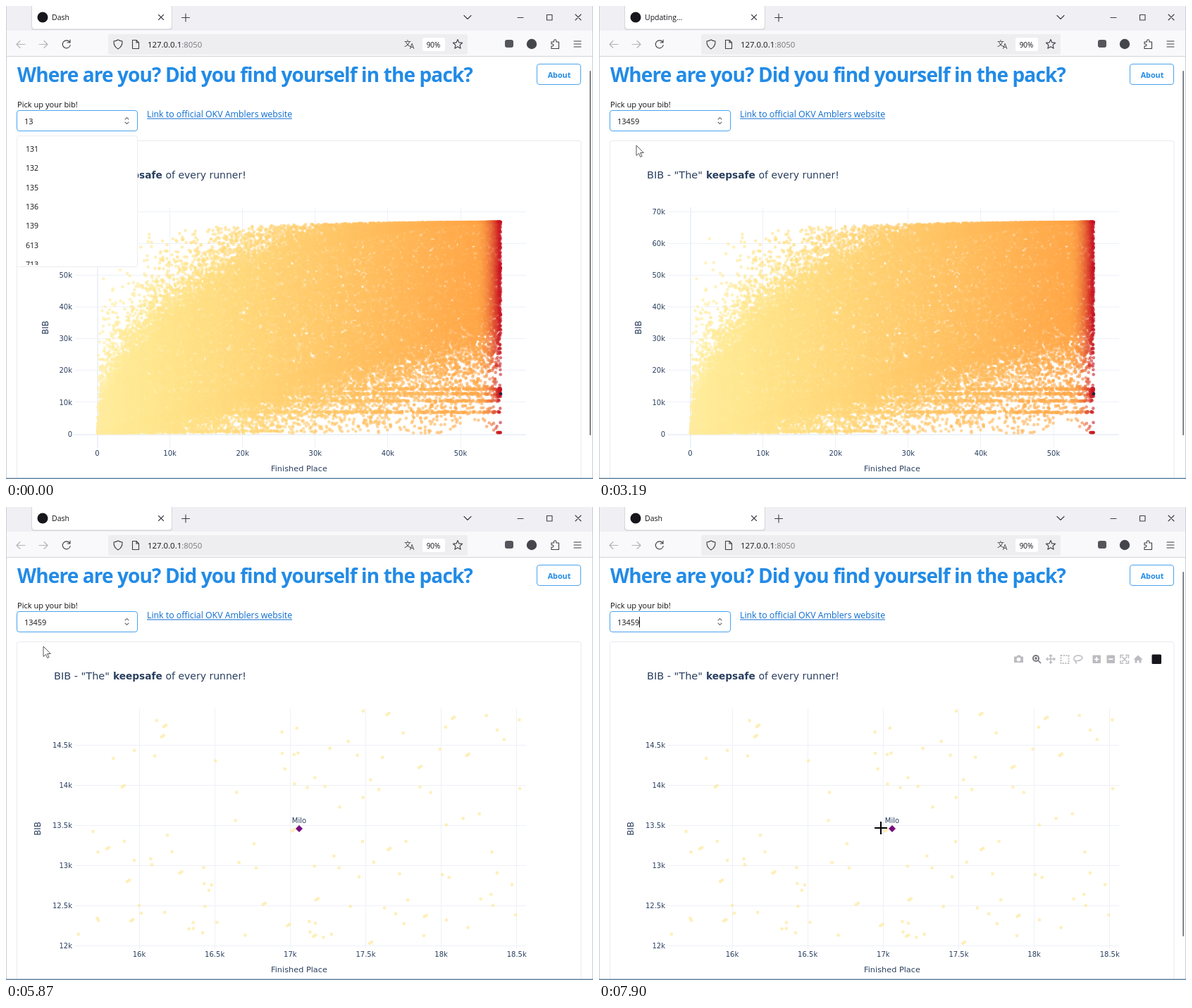
Animation, 833 px wide and 672 px high, one loop 8000 ms. Source, as an HTML page with a canvas:

```html
<!DOCTYPE html>
<html lang="en">
<head>
<meta charset="utf-8">
<title>Bib explorer</title>
<style>
html, body { margin: 0; width: 100%; height: 100%; overflow: hidden; background: #fff; }
canvas, svg { position: absolute; left: 0; top: 0; display: block; }
svg { font-family: "Open Sans", "Noto Sans", sans-serif; }
.plot { font-family: "DejaVu Sans", sans-serif; fill: #2a3f5f; font-size: 10px; }
.line { fill: none; stroke: #3c3c44; stroke-width: 1.1; stroke-linecap: round; stroke-linejoin: round; }
.soft { stroke: #b3b3b9; }
.mid { text-anchor: middle; }
.end { text-anchor: end; }
</style>
</head>
<body>
<canvas id="chart" width="833" height="672"></canvas>
<svg id="stage" width="833" height="672" viewBox="0 0 833 672">
  <!-- window frame and tab strip -->
  <rect width="833" height="36" fill="#f0f0f4"/>
  <rect y="35" width="833" height="36" fill="#f9f9fb"/>
  <rect y="71" width="833" height="1" fill="#d4d4da"/>
  <rect x="36" y="-3" width="200" height="37" rx="4" fill="#d5d5db"/>
  <rect x="37" y="-3" width="198" height="35.5" rx="4" fill="#fff"/>
  <circle cx="52" cy="16" r="7.5" fill="#16161c"/>
  <text id="tab" x="65" y="20" font-size="10.5" fill="#15141a">Dash</text>
  <path class="line" d="M216.500 12.500l7 7m0-7l-7 7M255 11v11m-5.500-5.500h11M650 13.500l5 5 5-5M726 16.500h8M767.500 12.500h7.500v7.500h-7.500zM808 12l8 8m0-8l-8 8"/>
  <!-- toolbar -->
  <path class="line soft" d="M27 54.500H15m5-5l-5 5 5 5M47 54.500h12m-5-5l5 5-5 5"/>
  <path class="line" d="M90.500 51.500a5.500 5.500 0 1 0 .700 4M91 48v4h-4"/>
  <rect x="145" y="40" width="510" height="29" rx="3" fill="#eeeef1"/>
  <path class="line" d="M159 48q3 1.800 6 2c.300 5-1.500 8.500-6 11-4.500-2.500-6.300-6-6-11q3-.200 6-2zM179.500 48.500h5.500l3.500 3.500v8.500h-9zM185 48.500v3.500h3.500"/>
  <text x="201" y="59" font-size="11.4" fill="#15141a">127.0.0.1<tspan fill="#77777e">:8050</tspan></text>
  <text x="565" y="57" font-size="10" fill="#3c3c44" font-family="Noto Sans CJK SC, Noto Sans CJK, sans-serif">文</text>
  <text x="573" y="61" font-size="10" fill="#3c3c44">A</text>
  <rect x="591" y="45" width="32" height="19" rx="3" fill="#fff"/>
  <text class="mid" x="606.500" y="58.500" font-size="10" fill="#15141a">90%</text>
  <path id="star" class="line"/>
  <rect x="708" y="48" width="12" height="11" rx="3" fill="#55555c"/>
  <circle cx="746" cy="54" r="7.200" fill="#45454c"/>
  <path class="line" d="M774 51h3.500v-1.500a1.700 1.700 0 0 1 3.400 0V51h3.600v9.500h-10.500V57h1.500a1.500 1.500 0 0 0 0-3H774zM806 50h10m-10 4h10m-10 4h10"/>
  <!-- page header -->
  <text x="16" y="108" font-size="28" font-weight="700" letter-spacing="-.88" fill="#228be6">Where are you? Did you find yourself in the pack?</text>
  <rect x="753.500" y="82.500" width="62" height="29" rx="3.500" fill="#fff" stroke="#4aa3ee"/>
  <text class="mid" x="785" y="101.500" font-size="10.8" font-weight="700" fill="#228be6">About</text>
  <text x="16" y="144" font-size="11.1" fill="#111">Pick up your bib!</text>
  <text x="200" y="158" font-size="12.35" fill="#0a6bd0">Link to official OKV Amblers website</text>
  <rect x="200" y="159.500" width="206" height="1" fill="#0a6bd0"/>
  <rect x="15.500" y="148.500" width="171" height="29" rx="3.500" fill="#fff" stroke="#4aa3ee"/>
  <text id="entry" x="26" y="168" font-size="10.9" fill="#111"></text>
  <rect id="caret" y="156" width="1" height="15" fill="#111"/>
  <path class="line" style="stroke:#777" d="M169 161l2.500-2.500 2.500 2.500M169 165l2.500 2.500 2.500-2.500"/>
  <path d="M15.500 680V194q0-2.500 2.500-2.500h795q3 0 3 2.500v486" fill="none" stroke="#e8eaef"/>
  <!-- chart text -->
  <g class="plot">
    <g font-size="14"><text x="68" y="245" font-size="14.500">BIB - "The"</text><text x="152" y="245" font-weight="700" font-size="13.7">keepsafe</text><text x="226.500" y="245">of every runner!</text></g>
    <text class="mid" x="416" y="661" font-size="11.3">Finished Place</text>
    <text id="yTitle" class="mid" font-size="11.8">BIB</text>
    <g id="wideTicks"></g>
    <g id="zoom">
      <g id="zoomTicks"></g><g id="zoomDots" fill="#fee695" fill-opacity=".62"></g>
      <path d="M416 452l5 5-5 5-5-5z" fill="#7a0a80"/>
      <text class="mid" x="416" y="449">Milo</text>
    </g>
  </g>
  <!-- chart tools -->
  <g id="tools" fill="#bcbcc0">
    <path fill-rule="evenodd" d="M589 212.500h3.500l1.500-2h3.500l1.500 2h3V221h-13zM595.500 213.700a2.900 2.900 0 1 0 .010 0z"/>
    <g fill="none" stroke="#77777d" stroke-width="2"><circle cx="620" cy="215" r="4"/><path d="M623 218l4 4M618 215h4m-2-2v4" stroke-width="1.700"/></g>
    <path d="M641 210v12m-6-6h12M639 212l2-2 2 2M639 220l2 2 2-2M637 214l-2 2 2 2M645 214l2 2-2 2" fill="none" stroke="#bcbcc0" stroke-width="1.500"/>
    <rect x="655.500" y="211" width="11" height="11" fill="none" stroke="#bcbcc0" stroke-width="2" stroke-dasharray="2 1.600"/>
    <path d="M677 219c-6-2-3-8 3-8s8 4 3 6.500c-3 1.500-8 .500-7 2s2 2 .500 3" fill="none" stroke="#bcbcc0" stroke-width="1.500"/>
    <rect x="700.500" y="210.500" width="11.500" height="11.500" rx="1"/><rect x="720.500" y="210.500" width="11.500" height="11.500" rx="1"/>
    <path d="M706.200 213v6.500m-3.200-3.200h6.500M723 216.200h6.500" stroke="#fff" stroke-width="1.700"/>
    <path d="M740 215v-4.500h4.500M747 210.500h4.500v4.500M751.500 218v4H747M744.500 222H740v-4M742 212.500l7.500 7.500m0-7.500l-7.500 7.500" fill="none" stroke="#bcbcc0" stroke-width="1.500"/>
    <path d="M765 210.500l6.500 6h-2v5h-3v-3.500h-3v3.500h-3v-5h-2z"/>
    <rect x="784.500" y="209.500" width="13.500" height="13.500" rx="1.500" fill="#15151b"/>
  </g>
  <!-- suggestion list -->
  <g id="list">
    <rect id="listBox" x="15.500" y="184.500" width="171" rx="3" fill="#fff" stroke="#ececf0"/>
    <clipPath id="listClip"><rect x="16" y="185" width="170" height="183"/></clipPath>
    <g id="rows" font-size="10.6" fill="#111" clip-path="url(#listClip)"></g>
  </g>
  <rect id="bar" x="828.300" y="92" width="1.700" height="518" rx=".8" fill="#707075"/>
  <path id="arrow" d="M0 0v14.500l3.500-3.200 2.300 5.200 2.200-1-2.300-5h4.600z" fill="#fff" stroke="#44444a" stroke-width=".9" stroke-linejoin="round"/>
  <path id="cross" d="M-9 0H9M0-9V9" stroke="#000" stroke-width="2"/>
  <path d="M.5 0v672M832.500 0v672" stroke="#c9d0d8"/>
  <rect y="670.500" width="833" height="1.500" fill="#6485a3"/>
</svg>
<script>
const $ = id => document.getElementById(id);
const clamp = (v, a = 0, b = 1) => Math.min(b, Math.max(a, v));
const mix = (a, b, k) => a + (b - a) * k;
const ramp = (t, a, b) => clamp((t - a) / (b - a));
const repeat = (n, make) => Array.from({ length: n }, (_, i) => make(i));

function seeded(s) {
  return () => {
    s = (s + 0x6d2b79f5) | 0;
    let r = Math.imul(s ^ (s >>> 15), 1 | s);
    r = (r + Math.imul(r ^ (r >>> 7), 61 | r)) ^ r;
    return ((r ^ (r >>> 14)) >>> 0) / 4294967296;
  };
}

// First tick position, pixel spacing, tick counts, first values and step in thousands
const wide = { x: 129.5, dx: 103.1, nx: 6, y: 608, dy: 45.07, ny: 8, fromX: 0, fromY: 0, step: 10 };
const near = { x: 189, dx: 107.15, nx: 6, y: 623.8, dy: 57.06, ny: 6, fromX: 16, fromY: 12, step: .5 };

const thousands = v => v ? v + "k" : "0";

function ticks(a) {
  const xs = repeat(a.nx, i => `<text class="mid" x="${a.x + i * a.dx}" y="639">${thousands(a.fromX + i * a.step)}</text>`);
  const ys = repeat(a.ny, i => `<text class="end" x="94" y="${a.y - i * a.dy + 3.6}">${thousands(a.fromY + i * a.step)}</text>`);
  return xs.concat(ys).join("");
}

const ctx = $("chart").getContext("2d");

function grid(a) {
  const width = i => a === wide && !i ? 2 : 1;
  ctx.fillStyle = "#edf1f8";
  repeat(a.nx, i => ctx.fillRect(Math.round(a.x + i * a.dx - .5), 286, width(i), 342));
  repeat(a.ny, i => ctx.fillRect(97, Math.round(a.y - i * a.dy - .5), 641, width(i)));
}

// Pale yellow to orange along the axis, turning red just before the end
function colour(k) {
  const red = ramp(k, .94, 1) ** 2.2, warm = k ** 1.25;
  const base = [255, mix(237, 162, warm), mix(166, 68, Math.sqrt(k) * .5 + warm * .5)];
  return `rgb(${base.map((v, i) => Math.round(mix(v, [200, 18, 36][i], red)))})`;
}

// Bibs follow a band that rises with the place, with thin tails on both sides
function runners() {
  const rnd = seeded(41), total = 50000;
  const dots = repeat(total, i => {
    const k = i / total, pick = rnd(), tail = -Math.log(1 - rnd());
    const ceiling = 307 + 14 * (1 - k) ** 2;
    const top = 307 + 298 * (1 - k ** .6) ** 1.7;
    const low = 606 - 172 * k;
    let y = mix(top, low, rnd());
    if (pick < .15) y = top - tail * 31;
    else if (pick < .36) y = low + tail * (14 + 28 * k);
    if (y < ceiling) y = mix(ceiling, Math.max(top, ceiling), rnd());
    if (y > 607) y = mix(low, 607, rnd());
    return [k, y];
  });
  // start groups that show as level rows: height and where each begins
  for (const [y, from] of [[544, .6], [551, .22], [561, .3], [577, .2], [411, .65], [376, .75]])
    repeat(Math.round(400 * (1 - from)), () => dots.push([mix(from, 1, rnd()), y + rnd() * 2 - 1]));
  repeat(180, () => dots.push([.45 * rnd() ** 1.4, 603.5 + rnd()]));
  repeat(60, i => dots.push([mix(.99, 1, rnd()), i % 4 ? mix(543, 556, rnd()) : 606]));
  return dots.sort((a, b) => a[0] - b[0]);
}

function dot(c, x, y) {
  c.beginPath();
  c.arc(x, y, 2.3, 0, 7);
  c.fill();
}

const layer = document.createElement("canvas");
layer.width = 833;
layer.height = 672;
const ink = layer.getContext("2d");
ink.globalAlpha = .6;
for (const [k, y] of runners()) {
  ink.fillStyle = colour(k);
  dot(ink, 130 + 572 * k, y);
}
ink.globalAlpha = 1;
ink.fillStyle = "#2a2140";
dot(ink, 702, 551);

function paint(zoomed) {
  ctx.clearRect(0, 0, 833, 672);
  grid(zoomed ? near : wide);
  if (!zoomed) ctx.drawImage(layer, 0, 0);
}

// Neighbours of the chosen runner; some finish side by side
function neighbours() {
  const rnd = seeded(9);
  let x, y;
  return repeat(135, i => {
    const close = i % 7 === 6;
    x = close ? x + 3 : mix(99, 734, rnd());
    y = close ? y - 2 : mix(289, 626, rnd());
    return `<circle cx="${x.toFixed(1)}" cy="${y.toFixed(1)}" r="2.4"/>`;
  }).join("");
}

$("zoomDots").innerHTML = neighbours();
$("wideTicks").innerHTML = ticks(wide);
$("zoomTicks").innerHTML = ticks(near);
$("star").setAttribute("d", "M" + repeat(10, i => {
  const r = i % 2 ? 3.2 : 7, a = i * Math.PI / 5;
  return `${641 + r * Math.sin(a)} ${54.5 - r * Math.cos(a)}`;
}).join("L") + "Z");

const bib = "13459";

function typed(t) {
  return bib.slice(0, t < 520 ? 2 : t < 720 ? 3 : t < 1320 ? 4 : 5);
}

function matches(q) {
  if (q === bib) return [bib];
  if (q === "13") return ["131", "132", "135", "136", "139", "613", "713"];
  return [q, "1" + q, ...repeat(5, i => q + i)];
}

function caretOn(t) {
  if (t < 5260) return t >= 520 && t < 2450 && !(t >= 1590 && t < 1920);
  return Math.max(0, t - 5340) % 1060 < 530;
}

// time, x, y
const path = [[2180, 110, 420], [2920, 53, 198], [6330, 53, 198], [6600, 171, 313], [7900, 400, 456]];

function pointer(t) {
  const i = clamp(path.findIndex(p => p[0] > t), 1, path.length - 1);
  if (t >= path[path.length - 1][0]) return path[path.length - 1].slice(1);
  const a = path[i - 1], b = path[i], k = ramp(t, a[0], b[0]);
  const eased = 1 - (1 - k) ** 1.6;
  return [mix(a[1], b[1], eased), mix(a[2], b[2], eased)];
}

const show = (id, on) => $(id).setAttribute("opacity", +on);
let lastZoom, lastQuery;

function draw(t) {
  const zoomed = t >= 5260;
  if (zoomed !== lastZoom) paint(lastZoom = zoomed);
  show("zoom", zoomed);
  show("wideTicks", !zoomed);
  $("yTitle").setAttribute("transform", `translate(${zoomed ? 49 : 59.5} 457) rotate(-90)`);

  const text = typed(t);
  $("tab").textContent = t >= 2990 && t < 5190 ? "Updating..." : "Dash";
  $("entry").textContent = text;
  $("caret").setAttribute("x", Math.round(26 + text.length * 6.2));
  show("caret", caretOn(t));

  // the list trails the field while typing
  const query = t < 850 ? typed(Math.min(t, 719)) : text;
  if (query !== lastQuery) {
    lastQuery = query;
    const rows = matches(query);
    $("rows").innerHTML = rows.map((s, i) => `<text x="28" y="${207 + i * 27.35}">${s}</text>`).join("");
    $("listBox").setAttribute("height", rows.length > 1 ? 186 : 34.5);
  }
  show("list", 1 - ramp(t, 2960, 3170));

  const bar = t < 520 ? 1 : t < 2180 ? 0 : t < 6000 ? 1 - ramp(t, 5560, 5730) : ramp(t, 6570, 6730);
  show("bar", bar);
  show("tools", ramp(t, 6580, 6880));

  const [x, y] = pointer(t), crossed = t >= 6640;
  show("arrow", t >= 2180 && !crossed);
  show("cross", crossed);
  for (const id of ["arrow", "cross"]) $(id).setAttribute("transform", `translate(${x} ${y})`);
}

const start = performance.now();
function tick() {
  draw((performance.now() - start) % 8000);
  requestAnimationFrame(tick);
}
tick();
</script>
</body>
</html>
```
